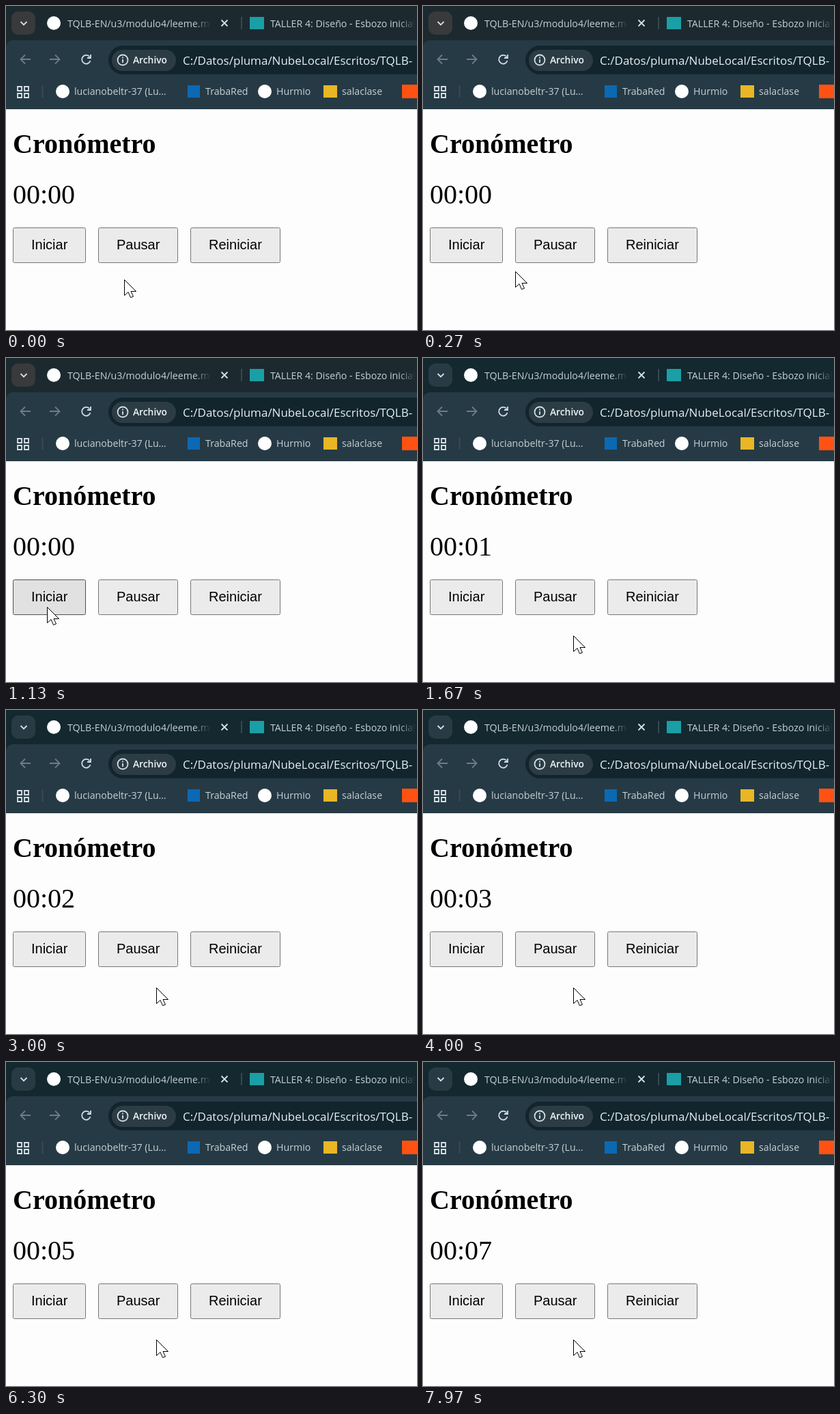
Write an HTML page that moves like this. It is 602x474 px and loops after 8000 ms.

```html
<!DOCTYPE html>
<html lang="es">
<head>
<meta charset="utf-8">
<title>Cronómetro</title>
<style>
  html, body { margin: 0; width: 100%; height: 100%; overflow: hidden; background: #fdfdfd; }
  svg { display: block; width: 602px; height: 474px; }
  text { white-space: pre; }
  .ui { font: 14.2px "Open Sans", "Noto Sans", sans-serif; fill: #c6d1d6; }
  .url { font-size: 17px; fill: #e6eff3; }
  .chip { font-size: 13.8px; font-weight: 600; fill: #eef5f8; }
  .serif { font: 40px "Liberation Serif", "Times New Roman", serif; }
  .bold { font-weight: bold; }
  .btn rect { fill: #ebebeb; stroke: #777; }
  .btn.hover rect { fill: #e1e1e1; stroke: #505050; }
  .btn text { font: 20px "Liberation Sans", Arial, sans-serif; }
  .line { fill: none; stroke: #d5e0e5; stroke-width: 1.8; }
  .dim { stroke: #6c7c84; }
  .sep { stroke: #3a4c55; }
</style>
</head>
<body>
<svg viewBox="0 0 602 474">
  <defs>
    <linearGradient id="fade">
      <stop offset="0" stop-color="#fff"/>
      <stop offset=".88" stop-color="#fff"/>
      <stop offset="1" stop-color="#000"/>
    </linearGradient>
    <mask id="clip1" maskUnits="userSpaceOnUse" x="90" y="8" width="210" height="34">
      <rect x="90" y="8" width="210" height="34" fill="url(#fade)"/>
    </mask>
    <mask id="clip2" maskUnits="userSpaceOnUse" x="387" y="8" width="213" height="34">
      <rect x="387" y="8" width="213" height="34" fill="url(#fade)"/>
    </mask>
  </defs>

  <!-- tab strip -->
  <rect id="strip" width="602" height="70"/>
  <rect id="menu" x="8" y="8" width="35" height="34" rx="10"/>
  <path class="line" d="M21.5 23l4.5 4.5 4.5-4.5"/>
  <circle cx="70" cy="25" r="10" fill="#fff"/>
  <g mask="url(#clip1)"><text class="ui" x="90" y="31">TQLB-EN/u3/modulo4/leeme.md</text></g>
  <path class="line" d="M315.5 20.5l9 9m0-9l-9 9"/>
  <path class="line sep" d="M345 16v18"/>
  <rect x="357" y="16" width="21" height="18" fill="#1a9fa6"/>
  <g mask="url(#clip2)"><text class="ui" x="387" y="31">TALLER 4: Diseño - Esbozo inicial d</text></g>

  <!-- toolbar -->
  <path d="M0 151V62Q0 50 12 50H602V151Z" fill="#263a45"/>
  <path class="line dim" d="M36 78H21.5m6.5-6.5L21.5 78l6.5 6.5M64 78h14.5M72 71.5l6.5 6.5-6.5 6.5"/>
  <path class="line" d="M122.5 74.5A6.3 6.3 0 1 0 123.5 80M124 71v5h-5"/>
  <rect x="150" y="58" width="480" height="42" rx="21" fill="#12252d"/>
  <rect x="155" y="64" width="94" height="31" rx="15.5" fill="#2b3c44"/>
  <circle class="line" cx="171" cy="79" r="7.5"/>
  <path class="line" d="M171 78v5M171 74.5v2"/>
  <text class="ui chip" x="186" y="84">Archivo</text>
  <text class="ui url" x="259" y="86">C:/Datos/pluma/NubeLocal/Escritos/TQLB-</text>

  <!-- bookmarks -->
  <path class="line" d="M17 118h6v6h-6zM27 118h6v6h-6zM17 128h6v6h-6zM27 128h6v6h-6z"/>
  <path class="line sep" d="M53.5 116v18"/>
  <circle cx="83" cy="125" r="10" fill="#fff"/>
  <text class="ui" x="100" y="130">lucianobeltr-37 (Lu…</text>
  <rect x="266" y="116" width="18" height="18" fill="#0b69b4"/>
  <text class="ui" x="292" y="130">TrabaRed</text>
  <circle cx="379" cy="125" r="10" fill="#fff"/>
  <text class="ui" x="396" y="130">Hurmio</text>
  <rect x="465" y="116" width="20" height="18" fill="#e9b626"/>
  <text class="ui" x="492" y="130">salaclase</text>
  <rect x="580" y="115" width="22" height="20" fill="#ff5212"/>

  <!-- page -->
  <rect y="151" width="602" height="323" fill="#fdfdfd"/>
  <text class="serif bold" x="10" y="215">Cronómetro</text>
  <text class="serif" id="clock" x="10" y="289">00:00</text>
  <g class="btn" id="start"><rect x="10.5" y="324.5" width="106" height="51" rx="2"/><text x="37" y="356">Iniciar</text></g>
  <g class="btn"><rect x="135.5" y="324.5" width="116" height="51" rx="2"/><text x="162" y="356">Pausar</text></g>
  <g class="btn"><rect x="270.5" y="324.5" width="131" height="51" rx="2"/><text x="297" y="356">Reiniciar</text></g>
  <path id="cursor" d="M.5.5V23.5L6 18.5 9.5 26.5 13.5 25 10 17.5H17.5Z" fill="#fff" stroke="#000"/>
</svg>
<script>
  const $ = id => document.getElementById(id);
  // pressing the button focuses the window; the count starts at 1 on release
  const LOOP = 8000, PRESS = 1270, RELEASE = 1350;
  // time, x, y of the pointer
  const path = [[0, 173, 400], [700, 60, 364], [1280, 60, 364], [1650, 220, 406], [LOOP, 220, 406]];
  const ease = p => p * p * (3 - 2 * p);

  function pointer(t) {
    const i = path.findIndex(k => k[0] > t);
    const [t0, x0, y0] = path[i - 1], [t1, x1, y1] = path[i];
    const p = ease((t - t0) / (t1 - t0));
    return [x0 + (x1 - x0) * p, y0 + (y1 - y0) * p];
  }

  function draw(t) {
    const [x, y] = pointer(t).map(Math.round);
    const secs = Math.max(0, Math.floor((t - RELEASE) / 1000) + 1);
    const focused = t >= PRESS;
    $("cursor").setAttribute("transform", `translate(${x} ${y})`);
    $("start").classList.toggle("hover", x >= 10 && x < 117 && y >= 324 && y < 376);
    $("clock").textContent = "00:" + String(secs).padStart(2, "0");
    $("strip").setAttribute("fill", focused ? "#13282f" : "#1c2a30");
    $("menu").setAttribute("fill", focused ? "#283b44" : "#383a3b");
  }

  const begin = performance.now();
  function tick() {
    draw((performance.now() - begin) % LOOP);
    requestAnimationFrame(tick);
  }
  tick();
</script>
</body>
</html>
```
